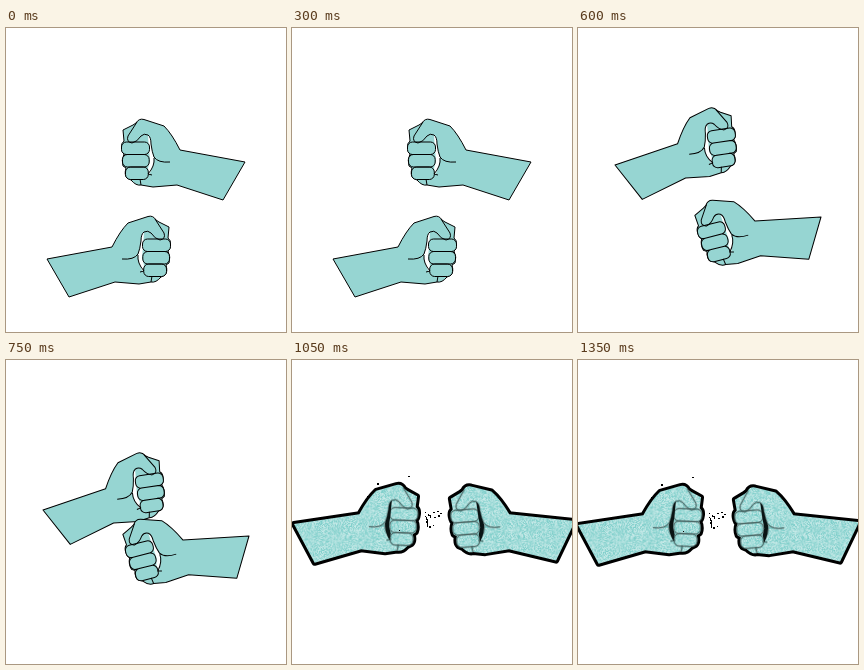
An HTML page with a canvas that plays this animation: 280 px wide and 304 px high, repeating every 1.5 s.

```html
<!DOCTYPE html>
<html lang="en">
<head>
<meta charset="utf-8">
<title>Fist bump</title>
<style>
html, body { margin: 0; width: 280px; height: 304px; overflow: hidden; background: #fff; }
canvas { display: block; }
</style>
</head>
<body>
<canvas id="stage" width="280" height="304"></canvas>
<script>
const canvas = document.getElementById('stage');
const ctx = canvas.getContext('2d');
const STEP = 150;
const TEAL = '#96d5d2';

// Right hand; its pivot is the upper corner of the sleeve end.
const PIVOT = { x: 239, y: 134 };
const body = new Path2D(`M239 134L174 122Q166 106 158 98L138 91.5Q133 90 130 95L127 97
  L117 102L118 113Q115 115 115.5 120Q116 125 118 126Q115 132 117 138L120 140Q118 147 121 150
  L125 152Q130 158 135 157L147 159L171 157L217 172Z`);
const gap = new Path2D('M142 107Q145 109 145 116Q146 124 148 130Q148 138 143 147L142 140L144 133L143 122Z');
const creases = new Path2D(`M131 94L122 108Q120 114 126 115Q131 114 135 108Q138 105 142 107
  Q145 109 145 116Q146 124 148 129Q152 135 164 134M148 130Q149 138 142 146L146 147M135 157L134 151`);
const fingers = new Path2D();
for (let i = 0; i < 3; i++) {
  fingers.roundRect(115.5 + i * i, 114 + i * 12.5, 28 - i * i * 1.3, 12.5, 5);
}

const hand = (x, y, turn) => ({ x, y, turn });
const mean = (a, b) => hand((a.x + b.x) / 2, (a.y + b.y) / 2, (a.turn + b.turn) / 2);

// Moves a pair outwards, and each hand downwards by its own amount.
const shift = ([l, r], out, downLeft, downRight) => [
  hand(l.x - out, l.y + downLeft, l.turn),
  hand(r.x + out, r.y + downRight, r.turn)
];

const rightHigh = [hand(41, 231, 0), hand(239, 134, 0)];
const leftHigh = [hand(37, 137, -8.3), hand(243, 189, -14)];
const level = [hand(2, 164, 2), hand(283, 161, -4.5)];
const passing = rightHigh.map((h, side) => mean(h, leftHigh[side]));

const plainScene = pair => () => eachHand(pair, plainHand);
const scenes = [
  plainScene(rightHigh),
  plainScene(shift(rightHigh, 6, -13, 13)),
  plainScene(rightHigh),
  plainScene(shift(passing, 23, 0, 0)),
  plainScene(leftHigh),
  plainScene(shift(leftHigh, 0, 13, -13)),
  plainScene(leftHigh),
  () => nearScene(0, 0),
  hitScene,
  () => nearScene(-2, 1)
];

function randomizer(seed) {
  return () => (seed = (seed * 1664525 + 1013904223) % 2 ** 32) / 2 ** 32;
}

function makeGrain(size) {
  const tile = document.createElement('canvas');
  tile.width = tile.height = size;
  const g = tile.getContext('2d');
  const random = randomizer(7);
  for (let i = 0; i < size * size; i++) {
    g.fillStyle = `hsl(177 45% ${64 + random() * 22}%)`;
    g.fillRect(i % size, Math.floor(i / size), 1, 1);
  }
  return ctx.createPattern(tile, 'repeat');
}
const grain = makeGrain(128);

function eachHand(pair, draw) {
  pair.forEach((h, side) => {
    ctx.save();
    ctx.translate(h.x, h.y);
    ctx.rotate(h.turn * Math.PI / 180);
    if (side === 0) ctx.scale(-1, 1);
    ctx.translate(-PIVOT.x, -PIVOT.y);
    draw();
    ctx.restore();
  });
}

function ink(path, color, width) {
  ctx.strokeStyle = color;
  ctx.lineWidth = width;
  ctx.stroke(path);
}

function fill(path, color) {
  ctx.fillStyle = color;
  ctx.fill(path);
}

function plainHand() {
  fill(body, TEAL);
  ink(body, '#000', 1);
  fill(gap, '#fff');
  fill(fingers, TEAL);
  ink(fingers, '#000', 1);
  ink(creases, '#000', 1);
}

function grainyHand() {
  fill(body, grain);
  for (const path of [fingers, creases]) {
    ink(path, 'rgba(30, 50, 50, 0.2)', 2.5);
    ink(path, '#4b6765', 0.8);
  }
  fill(gap, '#0a1414');
}

// Outlines go first so that touching fists merge.
function grainyPair(pair) {
  eachHand(pair, () => ink(body, '#000', 6));
  eachHand(pair, grainyHand);
}

function scatter(seed, count, x, y, width, height) {
  const random = randomizer(seed);
  const spread = () => random() + random() - 1;
  ctx.fillStyle = '#000';
  for (let i = 0; i < count; i++) {
    ctx.fillRect(Math.round(x + spread() * width), Math.round(y + spread() * height),
      1 + Math.round(random()), 1 + Math.round(random()));
  }
}

function shard(degrees, from, to, width) {
  ctx.save();
  ctx.translate(138, 125);
  ctx.rotate(degrees * Math.PI / 180);
  const wedge = new Path2D(`M${from} 0L${to} ${-width / 2}L${to} ${width / 2}Z`);
  fill(wedge, grain);
  ink(wedge, '#000', 1.3);
  ctx.restore();
}

function slip(x, y, dx) {
  ctx.drawImage(canvas, x, y, 40, 4, x + dx, y, 40, 4);
}

function nearScene(dx, dy) {
  ctx.translate(dx, dy);
  grainyPair(level);
  scatter(3, 18, 138, 158, 12, 11);
  scatter(11, 5, 138, 160, 110, 65);
}

function hitScene() {
  grainyPair(shift(level, -19, -25, -23));
  for (let i = 0; i < 3; i++) {
    slip(10, 153 + i * 6, 3 + i);
    slip(232, 143 + i * 6, -5 + i);
  }
  ctx.fillStyle = '#fff';
  ctx.fillRect(229, 157, 6, 10);

  shard(-108, 24, 64, 9);
  shard(-78, 24, 48, 5);
  shard(102, 42, 61, 4);
  shard(88, 45, 88, 4);
  shard(62, 50, 64, 4);
  scatter(5, 32, 171, 86, 11, 26);
  scatter(23, 18, 140, 150, 115, 110);
}

const start = performance.now();
function tick() {
  const step = Math.floor((performance.now() - start) / STEP) % scenes.length;
  ctx.resetTransform();
  ctx.fillStyle = '#fff';
  ctx.fillRect(0, 0, 280, 304);
  ctx.lineJoin = 'round';
  scenes[step]();
  requestAnimationFrame(tick);
}
tick();
</script>
</body>
</html>
```
